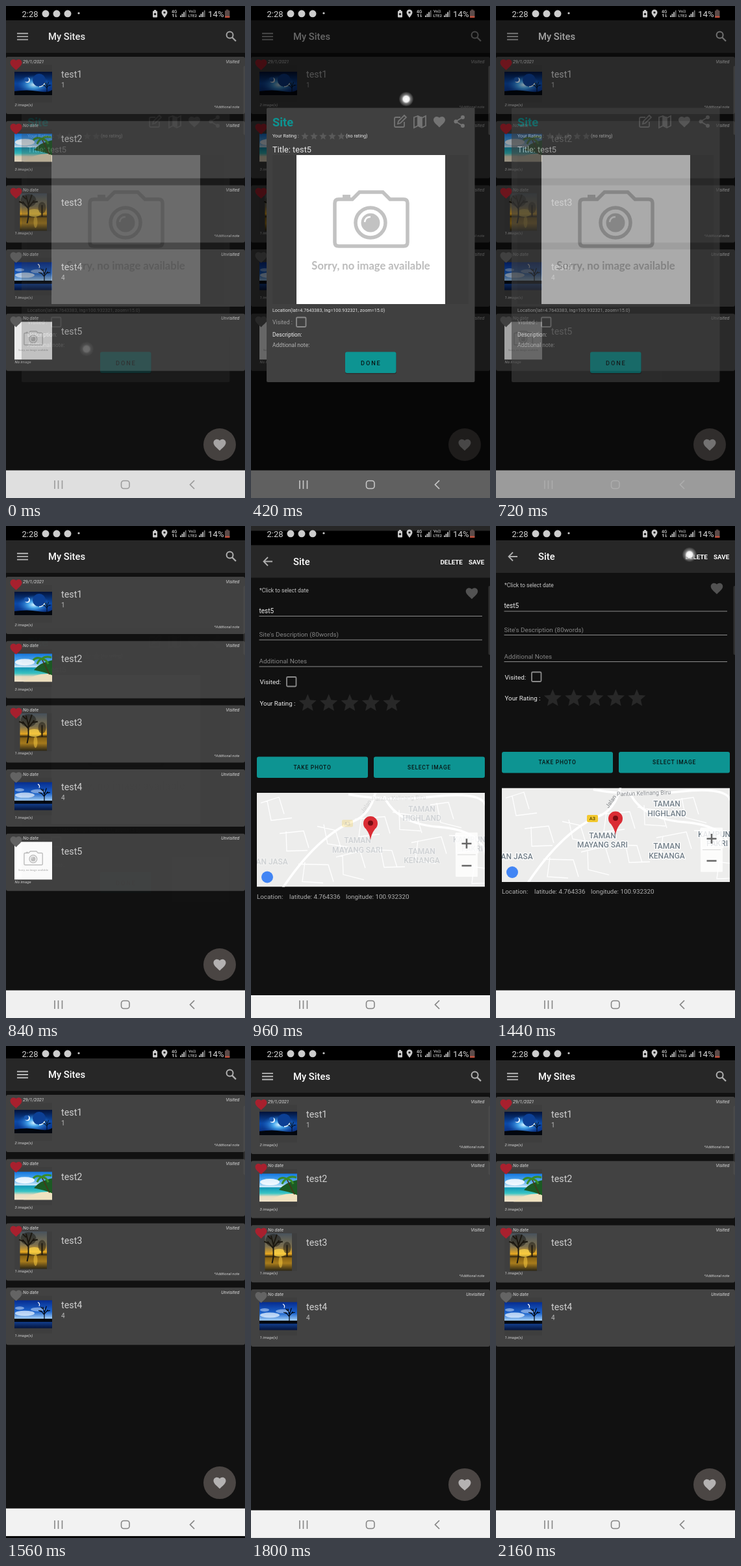
Animation of 368 by 756 pixels, one loop 2.22 s. Source, as an HTML page:

```html
<!DOCTYPE html>
<html lang="en">
<head>
<meta charset="utf-8">
<title>My Sites</title>
<style>
html, body { margin: 0; width: 100%; height: 100%; overflow: hidden; background: #000 }
svg { display: block; width: 368px; height: 756px; font-family: Roboto, sans-serif }
</style>
</head>
<body>
<script>
const TEAL = '#0d9492';
const HEART = 'M12 21.35l-1.45-1.32C5.4 15.36 2 12.28 2 8.5 2 5.42 4.42 3 7.5 3c1.74 0 3.41.81 4.5 2.09C13.09 3.81 14.76 3 16.5 3 19.58 3 22 5.42 22 8.5c0 3.78-3.4 6.86-8.55 11.54z';
const STAR = 'M12 17.27L18.18 21l-1.64-7.03L22 9.24l-7.19-.61L12 2 9.19 8.63 2 9.24l5.46 4.73L5.82 21z';

const text = (s, x, y, size, fill, extra = '') =>
  `<text x="${x}" y="${y}" font-size="${size}" fill="${fill}" ${extra}>${s}</text>`;
const rect = (x, y, w, h, fill, r = 0, extra = '') =>
  `<rect x="${x}" y="${y}" width="${w}" height="${h}" rx="${r}" fill="${fill}" ${extra}/>`;
const circle = (x, y, r, fill, extra = '') =>
  `<circle cx="${x}" cy="${y}" r="${r}" fill="${fill}" ${extra}/>`;
const blob = (x, y, rx, ry, fill, opacity = 1) =>
  `<ellipse cx="${x}" cy="${y}" rx="${rx}" ry="${ry}" fill="${fill}" opacity="${opacity}"/>`;
const shape = (d, fill) => `<path d="${d}" fill="${fill}"/>`;
const line = (d, color, w = 1) => `<path d="${d}" fill="none" stroke="${color}" stroke-width="${w}"/>`;
const icon = (d, x, y, w, fill) =>
  `<path d="${d}" fill="${fill}" transform="translate(${x} ${y}) scale(${w / 20}) translate(-12 -12)"/>`;
const group = (x, y, body, scale = 1) =>
  `<g transform="translate(${x} ${y}) scale(${scale})">${body}</g>`;
const layer = (id, body) => `<g id="${id}">${body}</g>`;
const gradient = (id, ...stops) => `<linearGradient id="${id}" x2="0" y2="1">${
  stops.map(([at, c]) => `<stop offset="${at}" stop-color="${c}"/>`).join('')}</linearGradient>`;
const END = 'text-anchor="end"', MID = 'text-anchor="middle"', MEDIUM = 'font-weight="500"', ITALIC = 'font-style="italic"';

const defs = `<defs>
  ${gradient('night', [0, '#031238'], [.5, '#0c4aa8'], [.8, '#0a3488'], [1, '#030a1c'])}
  ${gradient('beach', [0, '#1478e0'], [.3, '#5cb0f0'], [.48, '#d8eefa'], [.5, '#1298b8'], [.7, '#38c4c4'], [.82, '#e8dcc0'], [1, '#f0e4cc'])}
  ${gradient('sunset', [0, '#48525c'], [.35, '#7c7050'], [.55, '#e8a820'], [.62, '#3a2c10'], [.66, '#8a6414'], [.8, '#a87c1c'], [1, '#2c2614'])}
  ${gradient('lake', [0, '#062c90'], [.4, '#1c64cc'], [.65, '#a0ccf4'], [.67, '#02060e'], [.76, '#02060e'], [.78, '#123c88'], [1, '#04143c'])}
  <radialGradient id="glow"><stop offset="0" stop-color="#d8f4ff"/><stop offset=".35" stop-color="#4cb0f4" stop-opacity=".9"/>
    <stop offset="1" stop-color="#1762c4" stop-opacity="0"/></radialGradient>
  <radialGradient id="tap"><stop offset="0" stop-color="#fff"/><stop offset=".42" stop-color="#eee"/>
    <stop offset=".62" stop-color="#999" stop-opacity=".75"/><stop offset="1" stop-color="#888" stop-opacity=".15"/></radialGradient>
  <clipPath id="mapClip"><rect x="9" y="402.5" width="351" height="144.5"/></clipPath>
</defs>`;

const tree = (x, y, s, color) => group(x, y,
  line('M0 0V-10M0-7L-5-13M0-8L5-14M0-10L-2-18M0-10L3-19M-3-11L-8-13M3-12L8-13M-2-15L-5-18', color, 1.1), s);

const noImage = rect(0, 0, 229, 229, '#fff') +
  line('M59 74q0-6 6-6H86L97 57H133L144 68H165q6 0 6 6V134q0 6-6 6H65q-6 0-6-6Z', '#c2c2c2', 5.5) +
  rect(71, 61, 12, 6, '#c2c2c2') + circle(114, 104, 23, 'none', 'stroke="#c2c2c2" stroke-width="5.5"') +
  circle(114, 104, 14.5, '#c2c2c2') + line('M105 103q1-8 9-8', '#fff', 2.5) +
  text('Sorry, no image available', 114.5, 176, 16.6, '#bcbcbc',
    MID + ' style="font-family:Lato,sans-serif" font-weight="700"');

const photos = [
  group(13, 23, rect(0, 0, 58, 36, 'url(#night)') + blob(30, 20, 26, 15, 'url(#glow)') +
    circle(38, 13, 10, '#0c3f94') + line('M38 23A10 10 0 0 0 47 17', '#e4f6ff', 1.6) +
    circle(20, 13, 4, '#e4f2ff') + circle(18.5, 12, 3.6, '#1a58b0') +
    shape('M0 30Q20 27 36 30T58 28V36H0Z', '#02060e') + tree(50, 31, .8, '#02060e')),
  group(13, 19.5, rect(0, 0, 58, 43, 'url(#beach)') + blob(16, 13, 15, 5, '#fff', .85) +
    shape('M14 43Q32 29 58 31V43Z', '#f0e2c0') +
    shape('M30 25Q40 13 58 10V33Q46 28 30 25Z', '#1c5a24') + line('M54 32Q48 20 42 8', '#4a3418', 1.5) +
    line('M42 8Q34 4 29 10M42 8Q37 10 35 16M42 8Q48 3 57 6M42 8Q50 9 52 16', '#3a8c28', 3)),
  group(21.5, 12.5, rect(0, 0, 41.5, 57.5, 'url(#sunset)') + blob(22, 30, 11, 6, '#ffd84c', .7) +
    blob(24, 44, 3, 9, '#ffd040', .5) + blob(13, 11, 12, 10, '#1c1c18', .55) + blob(34, 22, 6, 9, '#1c1810', .5) +
    tree(13, 36, 1.8, '#1c1810') + line('M13 36L11 46M34 36V18', '#1c1810', 2)),
  group(13, 19.5, rect(0, 0, 58, 43, 'url(#lake)') + blob(16, 20, 15, 4, '#e4f2ff', .75) +
    blob(36, 14, 11, 3, '#d8eaff', .5) + blob(8, 12, 7, 2.5, '#d8eaff', .5) +
    line('M36 3q4 2 2 6', '#fff', 1.2) + tree(46, 30, 1.1, '#02060e'))
  , group(13, 12.5, noImage, 58 / 229)
];

const card = (i, date, state, sub, count, note, liked) => group(0, 78 + 98.7 * i,
  rect(0, 0, 368, 88, '#424242', 3) + rect(13, 12.5, 58, 58, '#3e3e3e') + photos[i] +
  icon(HEART, 15.5, 12.2, 18, liked ? '#a8202e' : '#646464') +
  text(date, 26, 9.6, 7.1, '#d8d8d8', ITALIC) + text(state, 359.5, 9.6, 7.1, '#d8d8d8', ITALIC + ' ' + END) +
  text('test' + (i + 1), 85, 32, 14.3, '#d0d0d0') + text(sub, 85, 47, 10, '#bbb') +
  text(count, 13.5, 76, 6, '#d0d0d0', ITALIC) +
  (note ? text('*Addtional note', 359.5, 79.2, 5.8, '#d0d0d0', ITALIC + ' ' + END) : ''));

const frame = title => rect(0, 0, 368, 756, '#111') + rect(0, 0, 368, 22, '#000') +
  rect(0, 22, 368, 50, '#272727') + text(title, 65, 52.4, 14.8, '#fff', MEDIUM) + rect(0, 713.5, 368, 42.5, '#f2f2f2');

const list = frame('My Sites') +
  line('M17 42.2H34M17 46.9H34M17 51.6H34', '#b8b8b8', 1.9) +
  circle(344.6, 44.5, 5, 'none', 'stroke="#b0b0b0" stroke-width="2"') + line('M348 48L354 54', '#b0b0b0', 2.3) +
  card(0, '29/1/2021', 'Visited', '1', '2 image(s)', true, true) +
  card(1, 'No date', 'Visited', '', '3 image(s)', false, true) +
  card(2, 'No date', 'Visited', '', '1 image(s)', true, true) +
  card(3, 'No date', 'Unvisited', '4', '1 image(s)', false, false) +
  layer('fifth', card(4, 'No date', 'Unvisited', '', 'No image', false, false)) +
  circle(329, 674, 25, '#4b4644') + icon(HEART, 329, 674.3, 19, '#b4b2b2');

const stars = (xs, y, w, fill) => xs.map(x => icon(STAR, x, y, w, fill)).join('');
const box = (x, y) => rect(x, y, 14.5, 14.5, 'none', 1.5, 'stroke="#8a8a8a" stroke-width="1.8"');
const GREY = '#747474';

const dialog = rect(24, 156.5, 320.5, 421.5, '#404040', 2) +
  text('Site', 33, 184.6, 18.2, TEAL, 'font-weight="700"') +
  line('M230 171H223Q221 171 221 173V184Q221 186 223 186H234Q236 186 236 184V178M226 181L227 177L236 168L239 171L230 180Z', GREY, 1.8) +
  line('M251 171L257 169L263 172L269 169V184L263 187L257 184L251 187ZM257 169V184M263 172V187', GREY, 1.8) +
  rect(257, 170, 6, 15, GREY) + icon(HEART, 290, 178, 18, GREY) +
  line('M326 171L315 177.5L326 184', GREY, 1.8) + circle(326, 171, 3, GREY) + circle(315.5, 177.5, 3, GREY) + circle(326, 184, 3, GREY) +
  text('Your Rating :', 33, 202.3, 7.25, '#e8e8e8') + stars([83, 97, 111, 125, 139], 200, 11.5, '#5a5a5a') +
  text('(no rating)', 146, 202.3, 7.3, '#e8e8e8') + text('Title: test5', 33, 225, 12.8, '#e8e8e8') +
  rect(33, 229, 302, 229, '#3c3c3c') + group(70, 229, noImage) +
  text('Location(lat=4.7643383, lng=100.932321, zoom=15.0)', 33, 470, 7.2, '#e4e4e4') +
  text('Visited :', 33, 489, 8.7, '#9c9c9c') + box(70, 478.5) +
  text('Description:', 33, 508.3, 8.6, '#eee') + text('Addtional note:', 33, 524.2, 8.5, '#b4b4b4') +
  rect(145, 532.5, 79, 33, '#303030', 3) + rect(145, 531.5, 78.5, 32.5, TEAL, 3) +
  text('DONE', 169, 551.6, 9.2, '#081616', MEDIUM + ' letter-spacing="1.9"');

const button = (x, label) => rect(x, 347, 171, 32.5, TEAL, 3) +
  text(label, x + 85.5, 366.4, 8.5, '#081616', MEDIUM + ' letter-spacing=".76" ' + MID);

const place = (s, x, y, anchor = MID) => text(s, x, y, 12, '#74808a',
  `${anchor} ${MEDIUM} stroke="#fff" stroke-width="2.5" paint-order="stroke"`);

let lanes = '';
for (let i = 0; i < 13; i++) {
  const x = 15 + i * 29, y = 418 + (i * 47) % 105;
  lanes += `M${x} ${y}l${28 + i % 3 * 9} ${-9 + i % 4 * 5}l8 26M${x + 10} ${y - 3}l${6 - i % 3 * 5} 30l32 ${i % 5 * 3 - 4}`;
}

const map = `<g clip-path="url(#mapClip)">` + rect(9, 402.5, 351, 144.5, '#ededec') +
  line(lanes, '#fff', 1.3) +
  line('M48 550Q76 508 104 482T158 446T192 400M150 405Q210 416 284 408T362 424M205 408Q224 450 290 455T362 500', '#fff', 3.5) +
  layer('labels',
    rect(140, 444, 17, 11, '#f2c82e', 2) + text('A3', 148.5, 452.3, 7.5, '#554400', MID + ' ' + MEDIUM) +
    text('Jalan', 173, 434, 9, '#808488', 'transform="rotate(-55 173 434)"') +
    text('Pantun Kelinang Biru', 186, 415, 9, '#808488', 'transform="rotate(-2 186 415)"') +
    place('TAMAN', 263, 431) + place('HIGHLAND', 263, 445.5) +
    place('TAMAN', 164, 479.5) + place('MAYANG SARI', 164, 494) +
    place('TAMAN', 263, 496) + place('KENANGA', 263, 510.5) +
    place('KAMPUNG', 311, 478, '') + place('PAKRI', 324, 492, '') + place('AN JASA', 7.5, 512, '')) +
  shape('M184 475Q183 466 177 458A11 11 0 1 1 191 458Q185 466 184 475Z', '#da2c34') + circle(184, 449, 4, '#780c12') +
  rect(315, 463.5, 34, 68, '#fff', 1, 'opacity=".82"') +
  line('M318 497.5H346', '#d8d8d8') + line('M324.5 480.5H339.5M332 473V488M324.5 514.5H339.5', '#666', 2.6) +
  circle(25, 532, 9, '#4285f4') + '</g>';

const site = frame('Site') +
  line('M33 47H20M26 40.5L19.5 47L26 53.5', '#b0b0b0', 1.8) +
  text('DELETE', 291.5, 51, 9.8, '#fff', 'font-weight="700"') + text('SAVE', 335, 51, 9.8, '#fff', 'font-weight="700"') +
  text('*Click to select date', 13, 94.2, 8.55, '#c4c4c4') + icon(HEART, 340, 96, 18.5, '#525252') +
  text('test5', 12.5, 126, 10, '#eee') + text("Site's Description (80words)", 12.5, 162.6, 9.85, '#858585') +
  text('Additional Notes', 12.5, 203.8, 9.95, '#858585') +
  line('M12.5 131H356M12.5 167.5H356M12.5 208.5H356', '#8c8c8c') +
  text('Visited:', 13.5, 235.6, 9.9, '#eee') + box(55, 224.5) +
  text('Your Rating :', 13.5, 268, 9.8, '#eee') + stars([87.3, 119.7, 152, 184.4, 216.8], 264.3, 27, '#282828') +
  button(9, 'TAKE PHOTO') + button(189, 'SELECT IMAGE') + map +
  text('Location:', 9, 565, 9.8, '#b0b0b0') + text('latitude: 4.764336', 59, 565, 9.8, '#b0b0b0') +
  text('longitude: 100.932320', 146, 565, 9.8, '#b0b0b0');

const bars = x => [0, 1, 2, 3].map(i => rect(x + i * 2.6, 14.5 - i * 2.6, 1.7, 2.5 + i * 2.6, i < 3 ? '#ccc' : '#777')).join('');

const status = text('2:28', 24.5, 16.6, 13, '#d4d4d4') +
  [61, 78, 95].map(x => circle(x, 11.8, 5.5, '#ccc')).join('') + circle(112, 11, 1.6, '#ccc') +
  rect(226, 7.5, 7, 10, '#ccc', 1) + rect(228, 6, 3, 2, '#ccc') + circle(229.5, 12.5, 1.8, '#222') +
  shape('M244 18Q239.5 12.5 239.5 10A4.5 4.5 0 0 1 248.5 10Q248.5 12.5 244 18Z', '#ccc') + circle(244, 10, 1.6, '#000') +
  text('4G', 255, 10.6, 6.5, '#ccc', MEDIUM) + line('M257.5 17V12.5L256 14M261.5 12.5V17L263 15.5', '#ccc') + bars(268) +
  text('Vo))', 281, 10.4, 6, '#ccc', MEDIUM) + text('LTE2', 280.5, 17.4, 6.2, '#ccc', MEDIUM) + bars(297) +
  text('14%', 311, 16.6, 13.3, '#d4d4d4') +
  rect(337, 7, 7.5, 11, '#5c4b49', 1) + rect(339, 5.5, 3.5, 2, '#5c4b49') + rect(337, 15.5, 7.5, 2.5, '#c0503c', 1);

const navIcons = layer('nav', line('M75 729V742M80.5 729V742M86.5 729V742', 'currentColor', 1.6) +
  rect(177.5, 729.5, 12.5, 12, 'none', 3.8, 'stroke="currentColor" stroke-width="1.6"') +
  line('M290 729L283.5 735.5L290 742', 'currentColor', 1.7));

document.body.innerHTML = `<svg viewBox="0 0 368 756">${defs}` +
  layer('list', list) + layer('dim', rect(0, 0, 368, 756, '#000')) + layer('dialog', dialog) + layer('site', site) +
  rect(365.5, 92, 4, 106, '#555', 2, 'opacity=".45"') + status + navIcons +
  layer('touch', circle(0, 0, 11, 'url(#tap)')) + '</svg>';

const el = id => document.getElementById(id);
const show = (id, opacity, x = 0, y = 0) => {
  el(id).setAttribute('opacity', opacity);
  el(id).setAttribute('transform', `translate(${x} ${y})`);
};
const ramp = (t, a, b) => Math.min(1, Math.max(0, (t - a) / (b - a)));
const settle = (t, start) => t < start ? 1 : Math.exp((start - t) / 67);

// [x, y, first moment, start of fade, end of fade, strength]
const taps = [[124, 527, 0, 0, 60, .25], [239, 143, 420, 540, 720, 1], [298, 44, 1440, 1470, 1560, 1]];

function draw(t) {
  const closing = t >= 1450;
  const open = settle(t, 865), close = settle(t, 1450);

  show('list', 1, 0, closing ? -15 * close : -30 * (1 - open));
  el('fifth').style.display = closing ? 'none' : '';

  const fade = 1 - ramp(t, 640, 842);
  show('dim', (.08 + .52 * ramp(t, 0, 120)) * fade);
  show('dialog', (.24 + .76 * ramp(t, 0, 110)) * fade);

  if (closing) show('site', 1 - ramp(t, 1460, 1545), 0, 31 * (1 - close));
  else show('site', ramp(t, 860, 950), 0, 31 * open);
  el('labels').setAttribute('opacity', .25 + .75 * ramp(t, 960, 1260));

  const grey = 133 + 67 * ramp(t, -30, 60) * fade;
  el('nav').style.color = `rgb(${grey},${grey},${grey})`;

  const tap = taps.find(([, , from, , to]) => t >= from && t < to);
  if (tap) show('touch', tap[5] * (1 - ramp(t, tap[3], tap[4])), tap[0], tap[1]);
  else show('touch', 0);
}

function tick() {
  draw(Math.floor(performance.now() % 2220 / 60) * 60);
  requestAnimationFrame(tick);
}
tick();
</script>
</body>
</html>
```
